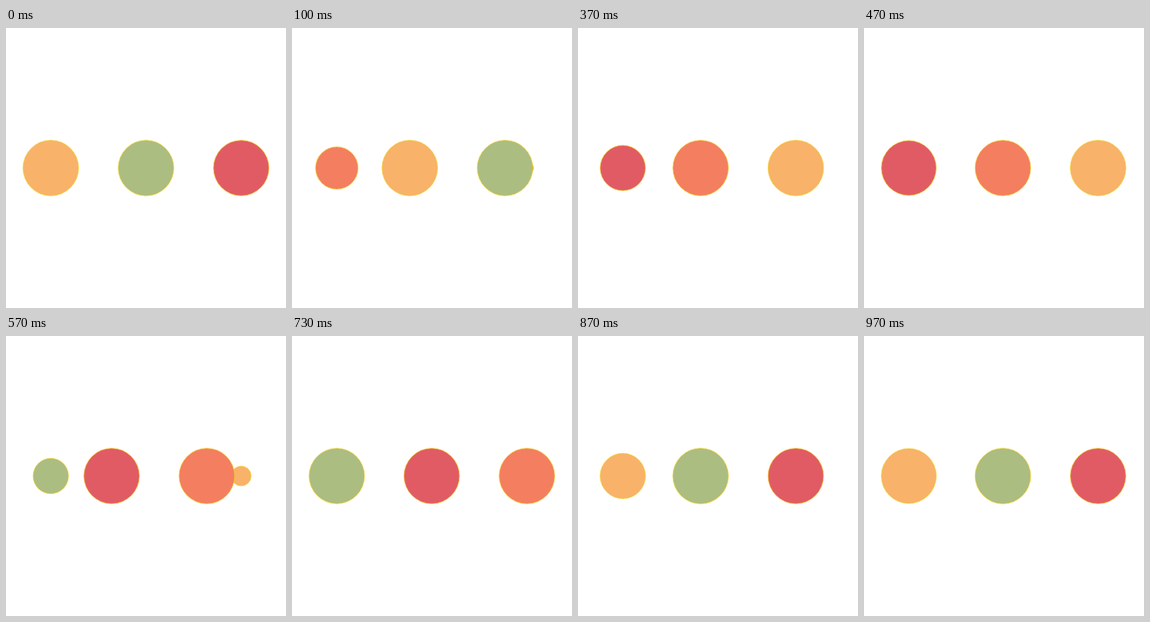
Animation, 351 px wide and 351 px high, one loop 1000 ms. Source, as an HTML page:

```html
<!DOCTYPE html>
<html lang="en">
<head>
<meta charset="utf-8">
<title>Loading dots</title>
<style>
  html, body { margin: 0; width: 100%; height: 100%; overflow: hidden; background: #fff; }
  svg { display: block; width: 100%; height: 100%; }
  circle { stroke: #f2cf1c; stroke-width: .7; }
</style>
</head>
<body>
<svg id="stage" viewBox="0 0 351 351"></svg>
<script>
  const LOOP = 1000, FRAMES = 30, STEPS = 4;
  const LEFT = 56.16, GAP = 119.34, MID = 175.5, RADIUS = 35.1;
  const COLORS = ['#e15b64', '#f47e60', '#f8b26a', '#abbd81'];
  const stage = document.getElementById('stage');

  function addDot(color) {
    const dot = document.createElementNS('http://www.w3.org/2000/svg', 'circle');
    dot.setAttribute('cy', MID);
    dot.setAttribute('fill', color);
    return stage.appendChild(dot);
  }

  const leaving = addDot(COLORS[0]);
  const dots = COLORS.map(addDot);

  // cubic-bezier(0, .5, .5, 1)
  function ease(x) {
    if (x <= 0) return 0;
    let lo = 0, hi = 1;
    for (let n = 0; n < 30; n++) {
      const s = (lo + hi) / 2;
      if (1.5 * s * s - 0.5 * s ** 3 < x) lo = s; else hi = s;
    }
    return 1.5 * lo - 0.5 * lo ** 3;
  }

  function place(dot, slot, size) {
    dot.setAttribute('cx', LEFT + GAP * slot);
    dot.setAttribute('r', Math.max(0, RADIUS * size - 0.3));
    dot.style.display = size > 0.01 ? '' : 'none';
  }

  function draw(ms) {
    // 30 frames per second, with frame starts rounded to 10 ms
    const frame = Math.floor((Math.floor((ms % LOOP) / 10) + 0.34) * 0.3);
    const pos = frame * STEPS / FRAMES;
    const step = Math.floor(pos);
    const e = ease(pos - step);

    dots.forEach((dot, j) => {
      const stageNo = (step + j) % STEPS; // 0 gone, 1 grows, 2 and 3 slide right
      if (stageNo === 0) place(dot, 0, 0);
      else if (stageNo === 1) place(dot, 0, e);
      else place(dot, stageNo - 2 + e, 1);
    });
    leaving.setAttribute('fill', COLORS[(STEPS - step) % STEPS]);
    place(leaving, 2, 1 - e);
  }

  const start = performance.now();
  function tick() {
    draw(performance.now() - start);
    requestAnimationFrame(tick);
  }
  tick();
</script>
</body>
</html>
```
